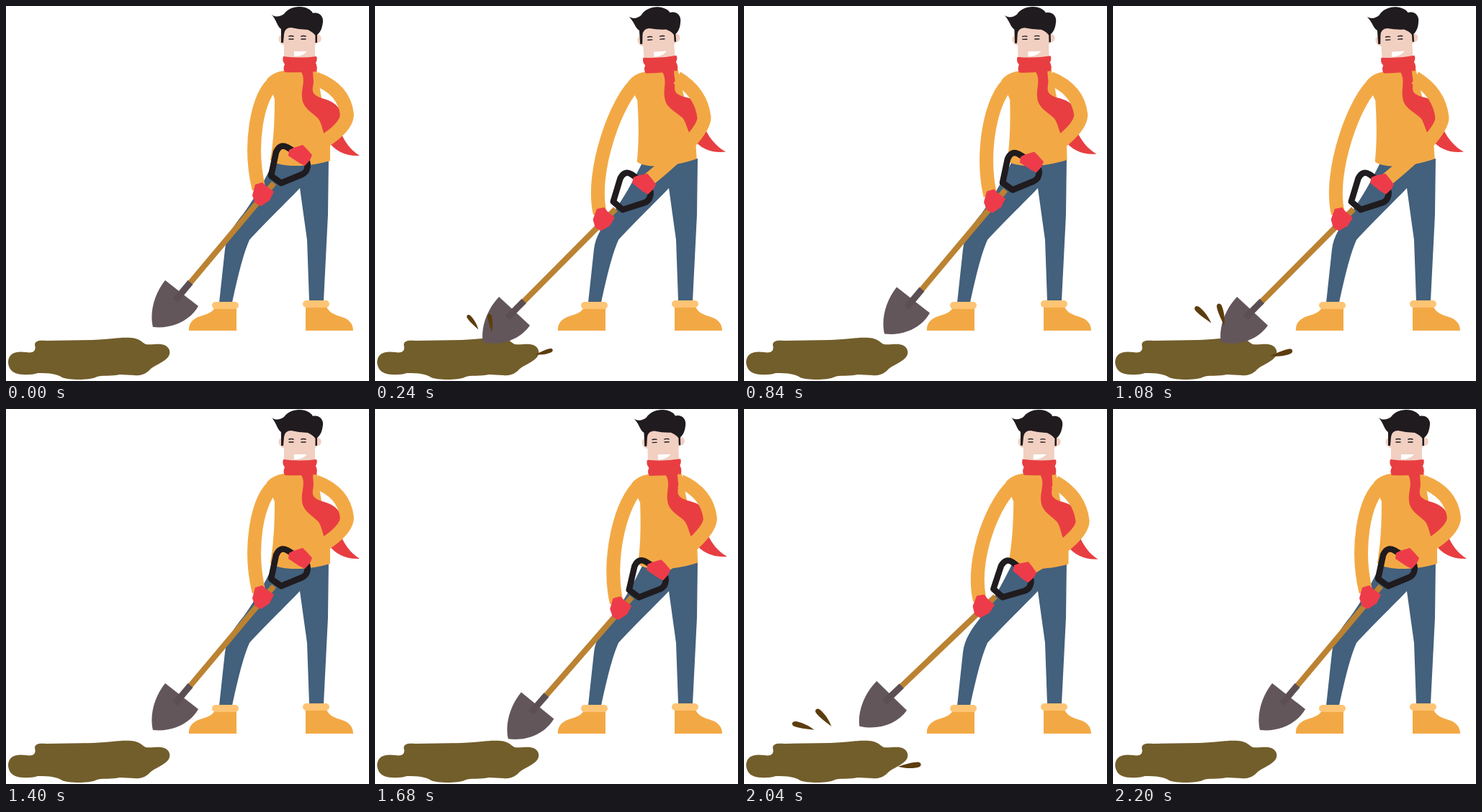
Animation, 504 px wide and 521 px high, one loop 2400 ms. Source, as an HTML page:

```html
<!DOCTYPE html>
<html lang="en">
<head>
<meta charset="utf-8">
<title>Digging</title>
<style>
  html, body { margin: 0; width: 100%; height: 100%; overflow: hidden; background: #fff; }
  svg { display: block; width: 504px; height: 521px; }
  .wool { fill: #f2a945; }
  .sleeve { fill: none; stroke: #f2a945; stroke-width: 19; }
  .scarf { fill: #e83e41; }
  .glove { fill: #ee3b4a; }
  .hair { fill: #1f1b1e; }
  .skin { fill: #f1cfc1; }
  .jeans { fill: #43607c; }
  .cuff { fill: #fdc474; }
  .soil { fill: #725e2b; }
  .clod { fill: #5c3d0d; }
  .steel { fill: #63565b; }
  .line { fill: none; stroke: #1f1b1e; stroke-width: 1.4; stroke-linecap: round; }
  .grip { fill: none; stroke: #1f1b1e; stroke-width: 8.5; stroke-linejoin: round; }
</style>
</head>
<body>
<svg viewBox="0 0 504 521">
  <path class="soil" d="M3 494C4 482 14 479 28 481C39 483 42 478 40 471C40 465 46 464 56 465L120 464C150 463 155 460 174 461C186 462 188 467 194 470C204 471 212 468 220 471C229 475 229 484 224 489C217 496 207 499 201 504C194 512 186 514 178 513L158 512C148 515 132 512 124 516C116 520 86 520 78 516C70 511 62 510 44 510C36 513 20 513 13 510C6 507 3 501 3 494Z"/>

  <path class="jeans" d="M372 216L448 212L447 290L441 410L421 410L418 325L408 253C390 272 358 303 338 325C329 345 321 380 314 412L296 412L304 338C306 320 316 305 330 288C348 263 360 240 372 216Z"/>
  <path class="wool" d="M290 419H320V451H254C253 441 260 434 270 431C280 428 287 425 290 419Z"/>
  <path class="wool" d="M416 418H445C449 426 456 429 466 432C476 435 482 441 482 451H416Z"/>
  <rect class="cuff" x="286" y="411" width="37" height="10" rx="5"/>
  <rect class="cuff" x="412" y="409" width="37" height="10" rx="5"/>

  <g id="body">
    <path class="wool" d="M386 90C376 91 368 95 362 102L373 129C373 165 371 190 367 214C380 225 420 224 450 215L450 190L437 122L432 90Z"/>
    <path class="scarf" d="M409 90C417 102 410 114 411 126C411 142 426 148 434 157C440 166 439 178 448 189C457 201 471 209 491 208C478 200 470 188 465 176L465 148C461 136 450 131 438 128C422 122 426 116 427 106L426 90Z"/>
    <path class="skin" d="M381 28H433V40C440 40 439 52 432 51L429 54V76H386V54C377 53 377 40 382 41Z"/>
    <path fill="#fff" d="M400 63H418Q412 70 402 70H400Z"/>
    <path class="line" d="M393 42Q396 41 399 42M410 42Q413 41 416 42M393 46H399M410 46H416"/>
    <path class="hair" d="M369 12C374 16 381 15 386 11C392 2 405 -1 415 2C421 4 425 7 426 10C434 8 441 14 440 22C439 32 436 37 432 40V51H429.500V41Q426 36 419 33Q408 33 396 30Q387 30 386 39L385 51H382V32C376 28 377 22 369 12Z"/>
    <path class="scarf" d="M385 70Q408 73 431 70Q433 74 430 79Q433 85 431 91Q408 93 387 92Q384 87 387 81Q383 76 385 70Z"/>
  </g>

  <path class="sleeve" id="armL" stroke-linecap="butt"/>
  <path class="sleeve" id="armR"/>

  <g id="shovel">
    <path d="M252 389L372 246" stroke="#bb8232" stroke-width="8"/>
    <path class="steel" d="M221 381L267 417C255 438 230 449 204 446C199 425 206 400 221 381Z"/>
    <path d="M235 409L256 384" stroke="#5b4f54" stroke-width="9"/>
    <path class="grip" d="M368 236L375 203Q380 191 390 196L412 209Q421 216 418 226Q417 231 411 234L382 246Z"/>
    <path class="glove" d="M393 200L399 197L412 193L418 199L425 207L422 214L415 222L407 218L392 208Z"/>
    <path class="glove" d="M346 248L356 245L361 250L372 258L366 270L354 278L346 274L342 263Z"/>
  </g>
  <g id="clods" class="clod"></g>
</svg>
<script>
const CYCLE = 800, STEP = 40;
const HIP = [405, 265], GRIP = [393.5, 220.5];
const $ = id => document.getElementById(id);
const mix = (a, b, k) => a + (b - a) * k;
const add = ([x, y], dx, dy) => [x + dx, y + dy];

// x and y move the shovel, turn rotates it about the grip, lean tips the body about the hip
const rest = { lean: 0, turn: 0, x: 0, y: 0 };
const crouch = { lean: -1.6, turn: 0, x: -9, y: 9.5 };
const dig = { lean: -3.7, turn: 4.8, x: -36, y: 38 };
const pull = { lean: 1.6, turn: 6.7, x: -16, y: 11.5 };
const moves = [
  { at: 0, pose: rest }, { at: 40, pose: crouch }, { at: 220, pose: dig },
  { at: 285, pose: dig }, { at: 480, pose: pull }, { at: 600, pose: rest }, { at: CYCLE, pose: rest }
];

// Clods fly in arcs and tilt on the way
const FLIGHT = { start: 180, end: 560 };
const clods = [
  { from: [152, 465], to: [50, 506], lift: 60, tilt: [63, -5] },
  { from: [175, 465], to: [81, 476], lift: 50, tilt: [92, 27] },
  { from: [236, 480], to: [227, 512], lift: 8, tilt: [161, 180] }
];
const DROP = "M16 0C6 -4 -4 -5 -12 -4C-17 -3 -17 2 -13 3C-6 4 4 2 16 0Z";
$("clods").innerHTML = clods.map(() => `<path d="${DROP}"/>`).join("");

function poseAt(t) {
  const i = moves.findIndex(m => m.at > t);
  const a = moves[i - 1], b = moves[i], k = (t - a.at) / (b.at - a.at);
  return Object.fromEntries(Object.keys(rest).map(p => [p, mix(a.pose[p], b.pose[p], k)]));
}

function spin([x, y], deg, [cx, cy]) {
  const r = deg * Math.PI / 180, c = Math.cos(r), s = Math.sin(r);
  return [cx + (x - cx) * c - (y - cy) * s, cy + (x - cx) * s + (y - cy) * c];
}

function drawArms({ lean, turn, x, y }) {
  const onBody = p => spin(p, lean, HIP);
  const onShovel = p => add(spin(p, turn, GRIP), x, y);

  const left = onBody([375, 104]), leftHand = onShovel([351, 254]);
  $("armL").setAttribute("d",
    `M${left}C${add(left, -28, 20)} ${add(leftHand, -14, -58)} ${leftHand}`);

  // The right elbow gives way as the hand reaches across
  const right = onBody([430, 101]), rightHand = onShovel([411, 205]);
  const bend = (rightHand[0] - right[0]) * .24;
  const elbow = add(right, 48 + bend, 45 - bend);
  $("armR").setAttribute("d",
    `M${right}Q${add(elbow, -4, -35)} ${elbow}Q${add(elbow, 0, 24)} ${rightHand}`);
}

function drawClods(t) {
  const k = (t - FLIGHT.start) / (FLIGHT.end - FLIGHT.start);
  const size = Math.max(0, Math.min(1, k * 5, (1 - k) * 5));
  clods.forEach(({ from, to, lift, tilt }, i) => {
    const x = mix(from[0], to[0], k), y = mix(from[1], to[1], k) - lift * 4 * k * (1 - k);
    $("clods").children[i].setAttribute("transform",
      `translate(${x} ${y}) rotate(${mix(...tilt, k)}) scale(${size})`);
  });
}

function draw(t) {
  const pose = poseAt(t);
  $("body").setAttribute("transform", `rotate(${pose.lean} ${HIP})`);
  $("shovel").setAttribute("transform",
    `translate(${pose.x} ${pose.y}) rotate(${pose.turn} ${GRIP})`);
  drawArms(pose);
  drawClods(t);
}

const start = performance.now();
function tick() {
  const t = (performance.now() - start) % CYCLE;
  draw(Math.floor(t / STEP) * STEP);
  requestAnimationFrame(tick);
}
tick();
</script>
</body>
</html>
```
